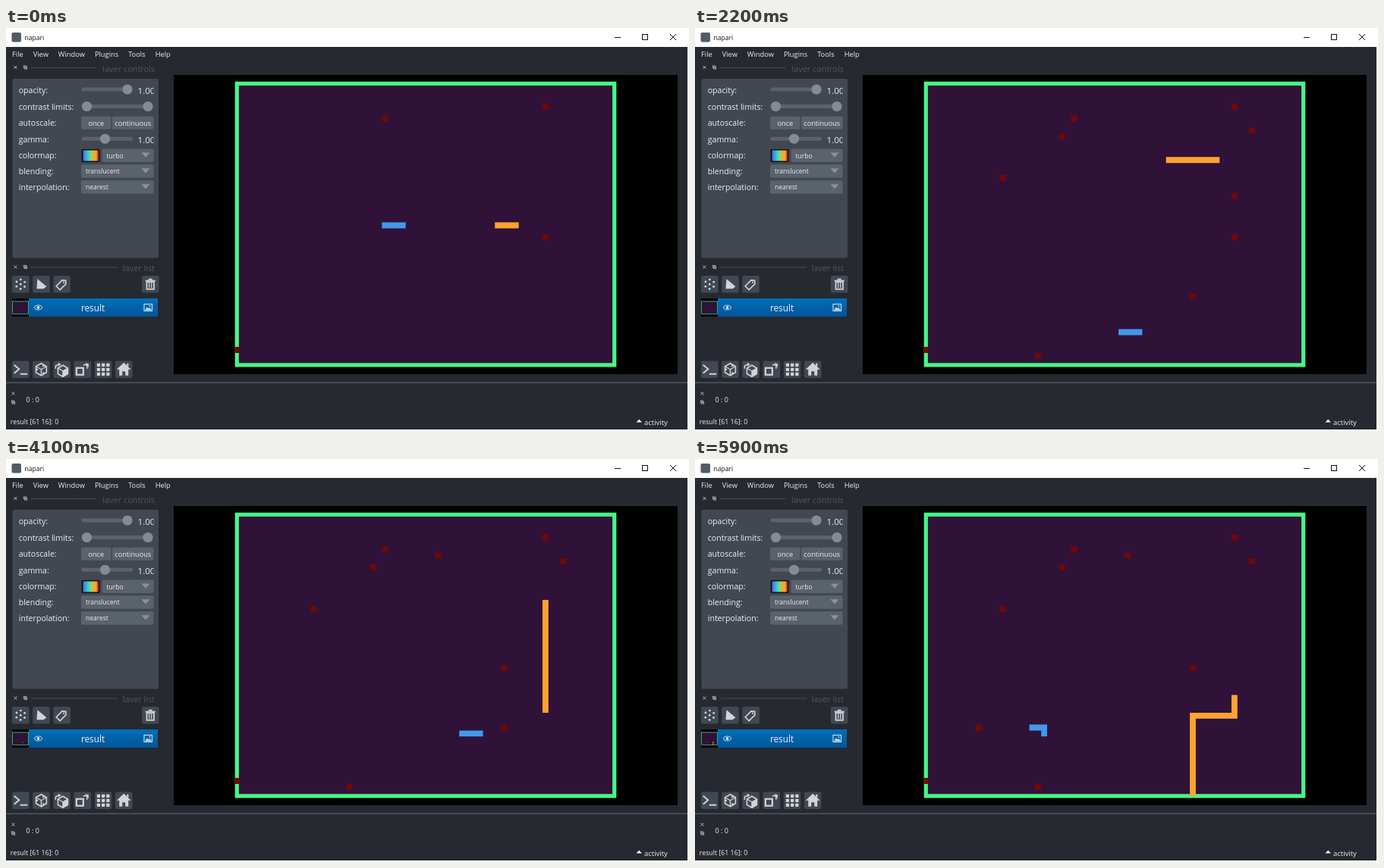
Animation, 900 px wide and 532 px high, one loop 6100 ms. Source, as an HTML page with a canvas:

```html
<!DOCTYPE html>
<html lang="en">
<head>
<meta charset="utf-8">
<title>Snake in an image viewer</title>
<style>
html, body { margin: 0; width: 100%; height: 100%; overflow: hidden; background: #fff; }
canvas { display: block; }
</style>
</head>
<body>
<canvas id="stage" width="900" height="532"></canvas>
<script>
const ctx = document.getElementById('stage').getContext('2d');
const LOOP = 6100, STEP = 100, LAST = 59, MOVES_PER_STEP = 1.19;
const CELL = 7.836, LEFT = 299.45, TOP = 68.5, COLS = 64, ROWS = 48;
const MAX_FOOD = 10, MEAL = 5;
const C = {
  window: '#262930', panel: '#414851', control: '#5a626c', knob: '#868b92',
  icon: '#d1d4d8', text: '#eeeff1', faint: '#50565f', border: '#47f785',
  field: '#301238', blue: '#4398ec', orange: '#fea331', food: '#700806'
};

// ---------- drawing helpers ----------
function rect(x, y, w, h, color, radius = 0) {
  ctx.fillStyle = color;
  ctx.beginPath();
  ctx.roundRect(x, y, w, h, radius);
  ctx.fill();
}
function disc(x, y, r, color) {
  ctx.fillStyle = color;
  ctx.beginPath();
  ctx.arc(x, y, r, 0, Math.PI * 2);
  ctx.fill();
}
function trace(points, close) {
  ctx.beginPath();
  points.forEach(([x, y]) => ctx.lineTo(x, y));
  if (close) ctx.closePath();
}
function line(points, color, width = 1, close = false) {
  ctx.strokeStyle = color;
  ctx.lineWidth = width;
  trace(points, close);
  ctx.stroke();
}
function poly(points, color) {
  ctx.fillStyle = color;
  trace(points, true);
  ctx.fill();
}
function frame(x, y, w, h, color, width = 1) {
  ctx.strokeStyle = color;
  ctx.lineWidth = width;
  ctx.strokeRect(x, y, w, h);
}
function text(str, x, y, size, color = C.text, align = 'left') {
  ctx.font = `${size}px "Open Sans", "Noto Sans", sans-serif`;
  ctx.textAlign = align;
  ctx.fillStyle = color;
  ctx.fillText(str, x, y);
  return ctx.measureText(str).width;
}
function clipped(x, y, w, h, draw) {
  ctx.save();
  ctx.beginPath();
  ctx.rect(x, y, w, h);
  ctx.clip();
  draw();
  ctx.restore();
}
function cross(x, y, r, color, width = 1) {
  line([[x - r, y - r], [x + r, y + r]], color, width);
  line([[x - r, y + r], [x + r, y - r]], color, width);
}
function gradient(x1, y1, x2, y2, ...colors) {
  const fill = ctx.createLinearGradient(x1, y1, x2, y2);
  colors.forEach((color, i) => fill.addColorStop(i / (colors.length - 1), color));
  return fill;
}
const polar = (r, angle) => [r * Math.cos(angle), r * Math.sin(angle)];
const ring = (n, r, turn = 0) => Array.from({ length: n }, (_, i) => polar(r, turn + i * 2 * Math.PI / n));
const mirror = half => [...half, ...half.map(([x, y]) => [-x, y]).reverse()];

// ---------- game ----------
const HEADING = { L: [-1, 0], R: [1, 0], U: [0, -1], D: [0, 1] };
function walk(x, y, route) {
  const cells = [[x, y]];
  for (const leg of route.split(' ')) {
    const [dx, dy] = HEADING[leg[0]];
    for (let n = Number(leg.slice(1)); n > 0; n--) cells.push([x += dx, y += dy]);
  }
  return cells;
}
// Each path starts at the tail, three cells behind the head.
const bluePath = walk(25, 24, 'R8 D18 R13 U5 L26 U1 L2');
const orangePath = walk(47, 24, 'L8 U11 R13 D21 L7 D13');
// Food appears in this order: one per move while fewer than ten lie on the field.
const foodOrder = [
  [25, 6], [52, 4], [52, 26], [0, 45], [39, 22], [55, 8], [23, 9],
  [13, 16], [52, 19], [45, 36], [19, 46], [34, 7], [45, 26], [9, 36]
];

function play() {
  const states = [];
  const waiting = foodOrder.slice();
  let food = waiting.splice(0, 4), length = 4, growth = 0;
  for (let head = 3; head < orangePath.length; head++) {
    const [hx, hy] = orangePath[head];
    if (growth > 0) { growth--; length++; }
    const left = food.filter(([x, y]) => x !== hx || y !== hy);
    if (left.length < food.length) growth += MEAL;
    food = left;
    if (head > 3 && food.length < MAX_FOOD && waiting.length) food.push(waiting.shift());
    states.push([
      [C.food, food.slice()],
      [C.blue, bluePath.slice(head - 3, head + 1)],
      [C.orange, orangePath.slice(head + 1 - length, head + 1)]
    ]);
  }
  return states;
}
const states = play();

// One path per colour keeps neighbouring cells seamless.
function drawCells(cells, color, x0, y0, unit, size = unit) {
  ctx.fillStyle = color;
  ctx.beginPath();
  for (const [x, y] of cells) ctx.rect(x0 + x * unit, y0 + y * unit, size, size);
  ctx.fill();
}
function drawGame(state) {
  const x = 301.7, y = 70.8, w = 502.6, h = 376.7, edge = 5.2;
  rect(221, 62, 664, 395, '#000');
  rect(x, y, w, h, C.border);
  rect(x + edge, y + edge, w - 2 * edge, h - 2 * edge, C.field);
  clipped(x, y, w, h, () => {
    for (const [color, cells] of state) drawCells(cells, color, LEFT, TOP, CELL);
  });
}

// The thumbnail keeps every second row and column, switching parity halfway.
const sampled = (n, size) => n % 2 === (n >= size / 2 ? 1 : 0);
function drawThumbnail(state) {
  rect(8, 357, 22, 24, '#000');
  rect(8, 360.5, 22, 17, C.field);
  frame(8.4, 360.9, 21.2, 16.6, '#3cc877', 0.8);
  for (const [color, cells] of state) {
    const kept = cells.filter(([x, y]) => sampled(x, COLS) && sampled(y, ROWS));
    drawCells(kept, color, 8, 361, 22 / COLS, 0.9);
  }
}

// ---------- window ----------
function dockIcons(x1, y1, x2, y2) {
  cross(x1, y1, 1.9, '#c4c7cb');
  for (const shift of [-2.2, -0.8]) frame(x2 + shift, y2 + shift, 3, 3, '#b4b8bd', 0.8);
}
function dockTitle(str, y, lineEnd) {
  dockIcons(12.5, y, 25.5, y);
  line([[33, y + 0.5], [lineEnd, y + 0.5]], '#454a53');
  clipped(120, y - 8, 80, 14, () => text(str, 196, y + 5.6, 10.9, C.faint, 'right'));
}
function slider(x1, x2, y, ...knobs) {
  rect(x1, y - 2.5, x2 - x1, 5, C.control, 2);
  for (const x of knobs) disc(x, y, 6.6, C.knob);
}
function valueText(y) {
  clipped(172, y - 12, 22.5, 18, () => text('1.00', 173.5, y, 11.6));
}
function pushButton(label, x, y, w) {
  rect(x, y - 8.5, w, 17, C.control, 2);
  text(label, x + w / 2, y + 3.7, 9.2, C.text, 'center');
}
function combo(label, x, y) {
  rect(x, y - 8.5, 194.5 - x, 17.5, C.control, 2);
  text(label, x + 6, y + 3.5, 8.5);
  poly([[178.5, y - 3.5], [189.5, y - 3.5], [184, y + 2.8]], '#8b9098');
}
function drawTitleBar() {
  rect(0, 0, 898, 25, '#fff');
  rect(7.5, 6, 12.5, 12.5, '#535b66', 2);
  text('napari', 24.5, 16, 8.6, '#111');
  line([[802, 12.5], [810, 12.5]], '#111');
  frame(838.5, 8.5, 7, 7, '#111');
  cross(879, 12, 4, '#111');
}
function drawMenu() {
  let x = 8;
  for (const label of ['File', 'View', 'Window', 'Plugins', 'Tools', 'Help']) {
    x += text(label, x, 37.6, 9.3) + 13;
  }
}
function drawControls() {
  dockTitle('layer controls', 52, 119);
  rect(8.5, 67, 192.5, 236.5, C.panel, 2);
  const rowY = i => 81.5 + 22.1 * i - 0.115 * i * i;
  ['opacity', 'contrast limits', 'autoscale', 'gamma', 'colormap', 'blending', 'interpolation']
    .forEach((label, i) => text(label + ':', 16.7, rowY(i) + 4.1, 10.6));
  slider(99.5, 160, rowY(0) - 0.5, 160);
  slider(106, 187, rowY(1), 106.5, 187);
  slider(99.5, 167, rowY(3) - 0.5, 130.5);
  valueText(rowY(0) + 5);
  valueText(rowY(3) + 5);
  pushButton('once', 99, rowY(2), 39.5);
  pushButton('continuous', 140, rowY(2), 54.5);
  rect(99.5, 160, 24, 17, '#15101c', 1);
  rect(101.5, 161.5, 21, 14, gradient(101.5, 0, 122.5, 0,
    '#3d6fd0', '#429cec', '#3fd0c0', '#7be070', '#fea331', '#fea331', '#7a0403'));
  combo('turbo', 126.5, rowY(4));
  combo('translucent', 99, rowY(5) - 0.3);
  combo('nearest', 99, rowY(6) - 0.2);
}

// Icons are drawn around the centre of their button.
function iconButton(x, y, icon) {
  rect(x, y, 22.5, 22.5, C.panel, 2);
  ctx.save();
  ctx.translate(x + 11.25, y + 11.25);
  icon();
  ctx.restore();
}
function cube(r, filled) {
  const corners = ring(6, r, Math.PI / 6);
  line(corners, C.icon, 1.6, true);
  for (const i of [1, 3, 5]) {
    const [a, b, c] = [corners[i], corners[(i + 4) % 6], corners[(i + 5) % 6]];
    line([[0, 0], filled ? a : [-a[0], -a[1]].map(v => -v)], C.icon, 1.4);
    if (!filled) disc((a[0] + c[0]) / 2 * 0.8, (a[1] + c[1]) / 2 * 0.8, 1.2, C.icon);
    else if (i === 1) poly([[0, 0], a, c, b], C.icon);
  }
}
const icons = {
  points() {
    for (const [x, y] of [[0, 0], ...ring(6, 6.2, -0.5)]) disc(x, y, 1.4, C.icon);
  },
  shapes() {
    poly([[-5, -7], [7, 3], [3, 6], [-6, 6]], C.icon);
  },
  labels() {
    ctx.rotate(-Math.PI / 4);
    line([[-7, -3.5], [4, -3.5], [7, 0], [4, 3.5], [-7, 3.5]], C.icon, 1.6, true);
    disc(3.5, 0, 1.2, C.icon);
  },
  trash() {
    rect(-6.5, -5.5, 13, 1.8, C.icon);
    rect(-2.5, -7.5, 5, 2, C.icon);
    frame(-4.7, -3, 9.4, 9.5, C.icon, 1.8);
    for (const x of [-1.5, 1.5]) line([[x, -2], [x, 5]], C.icon, 1.3);
  },
  console() {
    line([[-8.5, -6], [-2, -0.5], [-8.5, 5]], C.icon, 2);
    line([[-0.5, 6], [9, 6]], C.icon, 2);
  },
  dice() {
    cube(8, false);
  },
  roll() {
    line([[-8.5, -1], [-8, -5], [-4, -6.5]], C.icon, 1.6);
    poly([[-5, -9], [-1, -7], [-4.5, -4]], C.icon);
    ctx.translate(1.3, 2);
    cube(7.5, true);
  },
  transpose() {
    frame(-8, -2, 9, 9, C.icon, 2.2);
    line([[1, -6], [6, -6], [6, -1]], C.icon, 1.5);
    poly([[3, -8.5], [8, -7.5], [8, -2.5]], C.icon);
  },
  grid() {
    for (let i = 0; i < 9; i++) rect((i % 3) * 6.2 - 8.2, Math.floor(i / 3) * 6 - 8, 4.2, 4.2, C.icon, 0.6);
  },
  home() {
    poly(mirror([[0, -9], [-9.5, 0], [-6, 0], [-6, 8], [-2, 8], [-2, 2.5]]), C.icon);
    rect(4, -8, 2.2, 4, C.icon);
  }
};

function drawLayerList(state) {
  dockTitle('layer list', 315.5, 147);
  ['points', 'shapes', 'labels'].forEach((name, i) => iconButton(8 + i * 27.2, 327, icons[name]));
  iconButton(179, 327, icons.trash);
  rect(30, 357, 170, 24, gradient(0, 357, 0, 381, '#006fb9', '#00569a'));
  drawThumbnail(state);
  const pale = '#d0e2f0';
  ctx.strokeStyle = pale;
  ctx.lineWidth = 1;
  ctx.beginPath();
  ctx.ellipse(42.5, 369, 5, 3, 0, 0, Math.PI * 2);
  ctx.stroke();
  disc(42.5, 369, 1.9, pale);
  text('result', 114.5, 374.2, 11.8, C.text, 'center');
  frame(182, 364.5, 10.5, 9, pale, 1.1);
  poly([[183, 372.5], [186, 368.5], [188, 370.5], [189.5, 369], [192, 372.5]], pale);
  disc(189.5, 367, 0.9, pale);
}
function drawFooter() {
  ['console', 'dice', 'roll', 'transpose', 'grid', 'home']
    .forEach((name, i) => iconButton(8 + i * 27.2, 439.5, icons[name]));
  rect(0, 467.5, 898, 1.5, '#50555e');
  dockIcons(9.5, 482.5, 9.5, 494);
  text('0 : 0', 26.5, 493.5, 9);
  text('result [61 16]: 0', 5.8, 523, 8.8);
  poly([[830.5, 520.5], [838, 520.5], [834.2, 516.5]], C.text);
  text('activity', 841, 523.8, 9.5);
}

function render() {
  const tick = Math.min(LAST, Math.floor((performance.now() % LOOP) / STEP));
  const state = states[Math.floor(tick * MOVES_PER_STEP + 0.5)];
  rect(0, 0, 900, 532, '#fff');
  rect(0, 0, 898, 530, C.window);
  drawTitleBar();
  drawMenu();
  drawControls();
  drawLayerList(state);
  drawFooter();
  drawGame(state);
  requestAnimationFrame(render);
}
render();
</script>
</body>
</html>
```
